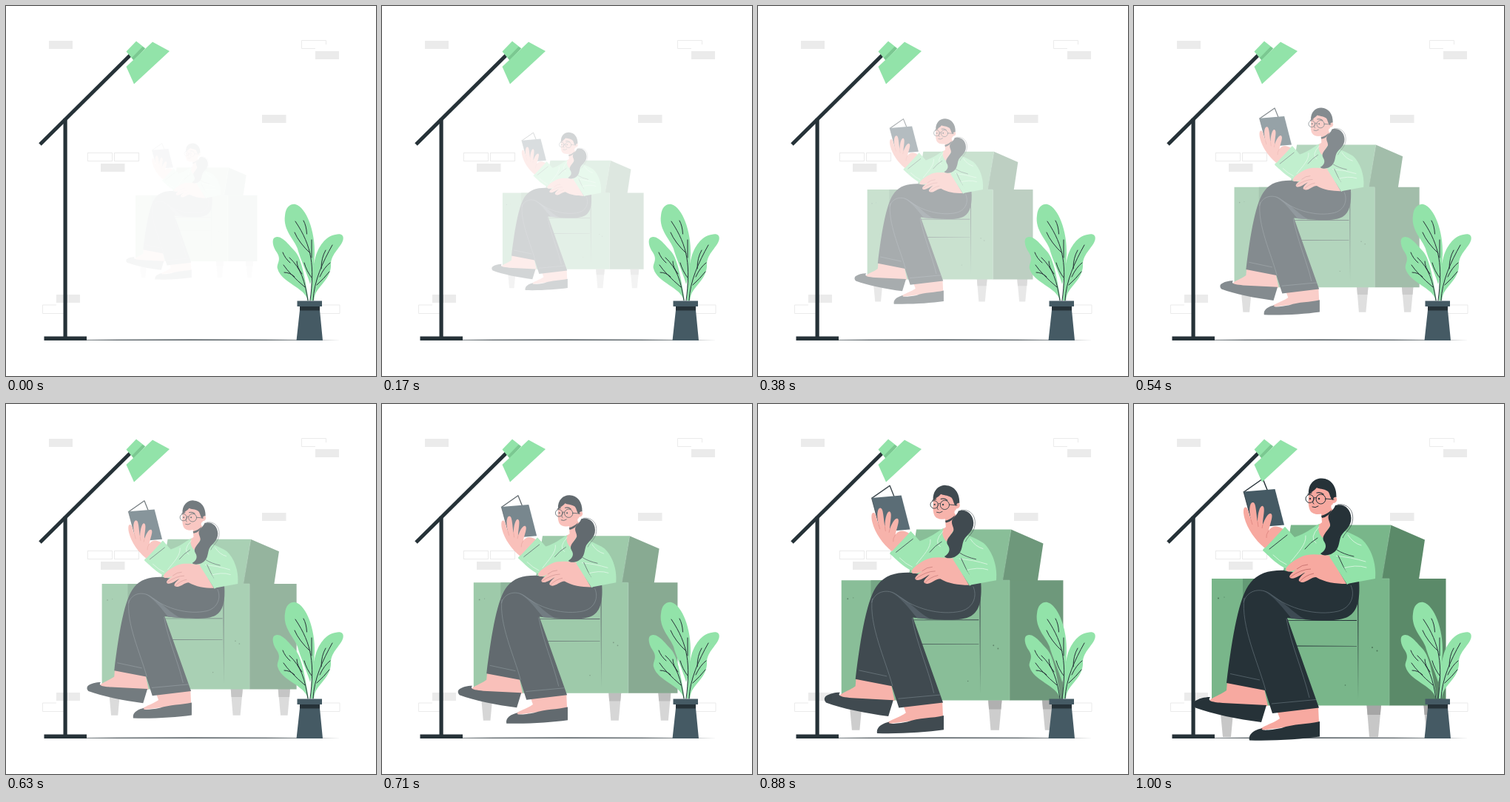
Write an HTML page that moves like this. It is 500 px wide and 500 px high and loops after 1040 ms.

```html
<!DOCTYPE html>
<html lang="en">
<head>
<meta charset="utf-8">
<title>Reading in an armchair</title>
<style>
  html, body { margin: 0; width: 100%; height: 100%; overflow: hidden; background: #fff; }
  svg { display: block; width: 100vw; height: 100vh; }
  .dark { fill: #263238; }
  .slate { fill: #455a64; }
  .mint { fill: #92e3a9; }
  .skin { fill: #f7a9a0; }
  .green { fill: #79b68a; }
  .shade { fill: #5b8a69; }
  .brick { fill: #ebebeb; }
  .line { fill: none; stroke: #263238; stroke-linecap: round; stroke-linejoin: round; }
  .pale { fill: none; stroke: #ebebeb; }
  .seam { fill: none; stroke: #5c6a71; stroke-width: .8; }
  .fold { fill: none; stroke: #d3f4dc; stroke-width: 1; stroke-linecap: round; }
</style>
</head>
<body>
<svg viewBox="0 0 500 500">
  <!-- wall and floor -->
  <g class="brick">
    <rect x="58" y="47" width="32" height="11"/>
    <rect x="418" y="61" width="32" height="11"/>
    <rect x="346" y="147" width="32.5" height="11"/>
    <rect x="128" y="213" width="32.5" height="11"/>
    <rect x="68" y="390" width="32" height="11"/>
  </g>
  <g class="pale">
    <path d="M432.5 52V46.5H399.5V57.5H418"/>
    <rect x="110.5" y="198.5" width="33" height="11"/>
    <rect x="146.5" y="198.5" width="33" height="11"/>
    <path d="M68 404H49.500V415.500H78"/>
    <path d="M422 404H451V415.500H422"/>
  </g>
  <path class="dark" d="M50 451.300Q250 449.900 452 451.300Q250 452.300 50 451.300Z"/>

  <g id="reader">
    <!-- armchair -->
    <g fill="#c7c7c7">
      <path d="M116 407H135L131 450H120Z"/>
      <path d="M314.500 407H334L330 450H318Z"/>
      <path d="M391.500 407H411L407 450H395.500Z"/>
    </g>
    <path fill="#a6a6a6" d="M116 407H135L134 420H117ZM314.500 407H334L332.800 420H315.500ZM391.500 407H411L410 420H392.500Z"/>
    <path class="green" d="M212 163.500H347L335 237H200Z"/>
    <path class="shade" d="M347 163.500L393 183.500L385 237H334.500Z"/>
    <path class="green" d="M105 236H345V407.500H105Z"/>
    <path class="shade" d="M345 236H421.500V407.500H345Z"/>
    <path fill="#639a75" d="M147 236H215V300H147Z"/>
    <path class="green" d="M200 236H303V300H200Z"/>
    <path class="dark" d="M208 292.200L301 292L301 293L208 293ZM219 326.500L301 326.900V327.500L219 327.500ZM302 240H303.500L303 398Z"/>
    <path fill="none" stroke="#8fc6a0" stroke-width=".6" d="M347 164L335 236H345V407"/>
    <g fill="#4c7759">
      <circle cx="322" cy="329" r="1"/><circle cx="328.500" cy="333.500" r="1"/>
      <circle cx="114" cy="262.500" r="1"/><circle cx="122" cy="261" r=".6"/><circle cx="285.500" cy="380" r=".8"/>
    </g>

    <!-- feet -->
    <path class="skin" d="M126 375L176 385L181 408L103 404C97 399 116 394 125 387Z"/>
    <path class="dark" d="M82 402C87 398 95 396 103 396C98 402 108 403 120 404L179 407L172 430C140 426 106 419 83 410.500Q79 406 82 402Z"/>
    <path class="skin" d="M193 414L249 409L250 431L171 441C168 437 188 432 197 425Z"/>
    <path class="dark" d="M156 454.500C154 446 163 440 174 438C168 442 184 441 199 438C215 432 235 433 251 429L251 449.500C225 453 190 455.500 156 454.500Z"/>

    <!-- trousers -->
    <path class="dark" d="M206 225C184 224 168 228 157 242C142 260 133 312 125 377L177 387L187 418L250 410.500L207 289C245 293 276 295 290 287C302 280 306 264 304 238L285 222Z"/>
    <path fill="#3d4a53" d="M174 252C190 260 202 277 213 290L232 291C215 284 198 260 174 252Z"/>
    <path class="seam" d="M148 268C153 250 174 247 187 259C209 276 245 287 276 280C294 275 299 258 293 245M149 262C144 300 168 350 178 387M130 364.500L170 373M186 405L246 399.500M206 290C212 325 228 360 237 397"/>

    <!-- shirt and neck -->
    <path class="mint" d="M250 162C240 168 232 175 217 180L204 166L174 197C184 208 194 217 206 223L203 225C230 231 270 228 287 226L288 243L326 236C328 215 320 194 308 183C296 175 276 168 265 165Z"/>
    <path class="skin" d="M253 147L268 138L268 160L255 181C250 176 248 169 250 163L254 160Z"/>
    <path class="dark" d="M253 151Q261 149 267 143Q264 152 254 154Z"/>
    <path class="fold" d="M232 178C233 190 222 200 212 213M188 204Q197 213 206 217M270 205Q294 207 313 213M279 223Q300 216 314 221M250 166Q236 181 246 188M289 177Q296 188 307 191"/>
    <path class="line" stroke-width=".9" d="M276 205L291 237M231 196Q238 187 248 181M297 206Q283 203 274 197"/>

    <!-- book and raised hand -->
    <path class="line" style="fill: #fff" stroke-width="1.500" d="M149 118.500L174 101L180 116"/>
    <path class="slate" d="M148 118.500L190.500 115L203 163.500L161 167Z"/>
    <path class="line" stroke-width=".8" d="M148 118.500L161 166"/>
    <path class="skin" d="M176 194C164 184 153 169 149 153C147 144 148 138 152 140C155 143 155 150 158 156C155 145 156 132 161 133C165 133 165 148 167 159C167 146 171 136 174 138C178 140 174 154 174 163C177 155 181 147 185 148C189 150 184 161 182 171C187 164 194 164 203 170L179 195Z"/>
    <path class="mint" d="M204 166L174 198L182 205L213 176Z"/>
    <path class="line" stroke-width=".9" d="M207 177L183 196"/>
    <path fill="none" stroke="#d97f79" stroke-width=".7" d="M158 156L160 163M167 159L168 166M174 163L173 168M182 171Q178 177 179 181"/>

    <!-- resting hand -->
    <path class="skin" d="M265 205C249 203 236 202 227 206C216 211 207 218 205 223C205 228 213 227 220 223C214 228 208 232 211 235C216 238 225 231 232 227C226 232 220 238 224 240C231 244 238 234 246 234C258 241 272 243 287 243Z"/>
    <path fill="none" stroke="#b6615f" stroke-width=".7" d="M220 223Q227 217 235 217M211 234Q226 223 239 223M224 240Q232 231 243 229"/>
    <path class="mint" d="M264 206L272 204L295 239L288 244Z"/>

    <!-- head -->
    <path class="skin" d="M237 117C235 127 235 138 238 144C242 151 254 150 262 145C266 141 268 137 269 134C275 134 276 126 271 125L264 112L246 108Z"/>
    <path class="dark" d="M236 122C235 107 245 100 254 100.500C266 101 274 111 273.500 126C271 125 269 127 268.500 130C265 128 265 121 262 118C256 114 250 115 247 113C244 117 239 119 236 122Z"/>
    <path class="dark" d="M272 137C284 134 293 142 293.500 154C294 166 284 171 280 178C276 186 279 197 266 203C260 205 254 205 252 202C259 198 261 192 257 186C252 178 262 172 265 165C266 160 261 156 263 150C266 144 270 143 272 137Z"/>
    <path fill="none" stroke="#263238" stroke-width=".6" d="M275 136C289 134 297 144 295.500 157C294 169 285 173 282 181"/>
    <g class="line" stroke-width="1">
      <circle cx="237.500" cy="128" r="5.500"/>
      <circle cx="252.500" cy="128.500" r="6.500"/>
      <path d="M243 127Q244 125.500 246 127M259 128L270 129M243 129Q240 134 243 135M241 139Q245 141 249 138"/>
      <path stroke-width="1.300" d="M247 120Q252 118.500 256 122M235 122L240 120"/>
    </g>
    <circle class="dark" cx="238" cy="128" r="1.200"/><circle class="dark" cx="250" cy="128" r="1.300"/>
    <ellipse cx="267.500" cy="139" rx="1.100" ry="3" fill="#fff"/>
  </g>

  <!-- lamp -->
  <path class="dark" d="M77.500 152H82.700V447H77.500ZM51.500 446.500H109V452H51.500Z"/>
  <path fill="none" stroke="#263238" stroke-width="5" d="M46 187L168 66.300"/>
  <path class="mint" d="M162.500 61.500L176 47.500L188 57L172.500 73.500Z"/>
  <path fill="#7bc891" d="M170 70L184.500 55L188 57.500L172.500 73.500Z"/>
  <path class="mint" d="M162.500 82L198 48.500L221 61L173 105.500Z"/>

  <!-- plant -->
  <g class="mint">
    <path d="M411 376C408 364 397 340 394 328C390 316 374 303 377 283C378 271 385 267 391 268C406 272 418 305 417 335C416 352 415 365 411 376Z"/>
    <path d="M412 398C412 372 414 354 418 340C422 325 432 311 445 309C452 307 457 309 455.500 316C453 326 440 334 439 348C440 364 429 373 421 384Q417 389 416 398Z"/>
    <path d="M408 398C404 380 372 374 367 355C365 348 373 344 366 333C360 325 359 315 363 313C372 308 383 324 391 332C400 343 404 368 409 398Z"/>
  </g>
  <g class="line" stroke-width="1">
    <path d="M411 398C417 352 414 325 391 291M402 290Q406 297 406.500 308M390 306Q396 320 411 334M413 316V340M403 347Q406 358 413 367"/>
    <path d="M415 398C416 372 428 346 441 323M432 330Q426 340 426 355M438 347Q430 353 424 366M437 359Q430 368 420 377"/>
    <path d="M408 398C404 372 399 355 383 340M374 333Q377 341 384 347M375 350Q383 362 404 380M376 360Q384 360 390 366M393 345Q393 353 400 362"/>
  </g>
  <path class="slate" d="M393.500 398.500H427V406H393.500ZM397 411H424L428 452H392.500Z"/>
  <path class="dark" d="M397 406H424V411.500H397Z"/>
</svg>
<script>
  const LOOP = 1040, STEPS = 25, CX = 250.7, CY = 277.4;
  const reader = document.getElementById('reader');
  const start = performance.now();

  function draw(now) {
    const t = Math.max(0, now - start) % LOOP;
    // 24 steps a second, with change times rounded to 10 ms
    const step = Math.min(STEPS - 1, Math.floor((t + 5) * 0.024));
    const p = (step + 1) / STEPS;
    const scale = 0.5 + 0.5 * (p + 0.15 * p * p * (1 - p));
    reader.setAttribute('opacity', p);
    reader.setAttribute('transform',
      `translate(${CX} ${CY}) scale(${scale}) translate(${-CX} ${-CY})`);
    requestAnimationFrame(draw);
  }
  draw(start);
</script>
</body>
</html>
```
